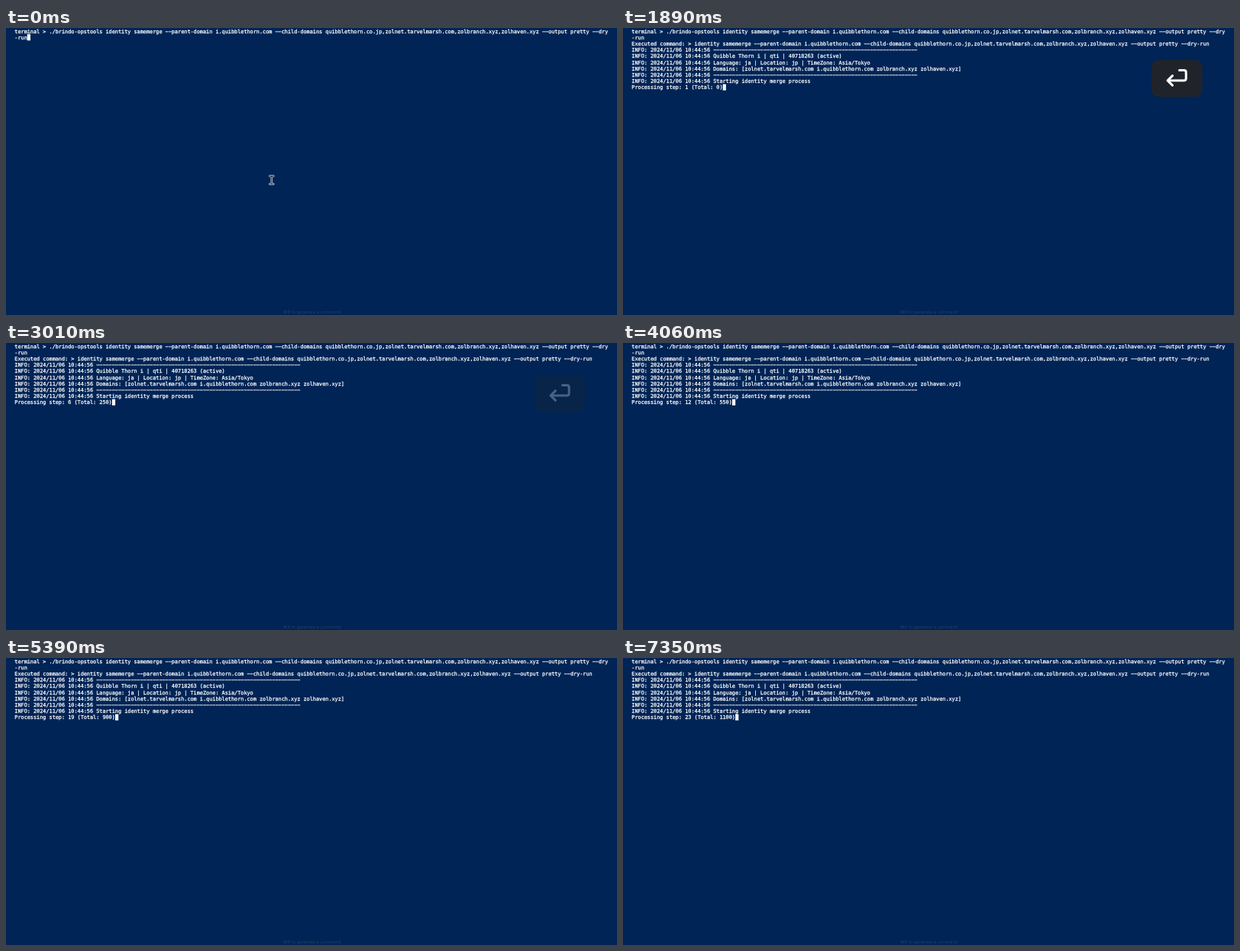
An HTML page that plays this animation: 800 px wide and 377 px high, repeating every 8 s.

```html
<!DOCTYPE html>
<html lang="en">
<head>
<meta charset="utf-8">
<title>Terminal session</title>
<style>
  html, body { margin: 0; width: 100%; height: 100%; overflow: hidden; background: #002456; }
  svg { display: block; width: 100%; height: 100%; }
  .row { font: 6.835px "DejaVu Sans Mono", monospace; fill: #fff; stroke: #fff; stroke-width: .26; text-rendering: geometricPrecision; }
  .hint { font: 5.75px Inter, "DejaVu Sans", sans-serif; fill: #213f64; text-anchor: middle; text-rendering: geometricPrecision; }
  .line { fill: none; stroke-linecap: round; stroke-linejoin: round; }
</style>
</head>
<body>
<svg id="stage" viewBox="0 0 800 377">
  <defs>
    <path id="beam" d="M345.4 194.6H350.2M347.8 194.6V205M345.4 205H350.2"/>
  </defs>
  <rect width="800" height="377" fill="#002456"/>
  <g id="rows"></g>
  <rect id="caret" width="4.2" height="8.2" fill="#fff"/>
  <text class="hint" x="400.5" y="375">⌘K to generate a command</text>
  <g id="pointer" class="line">
    <use href="#beam" stroke="#dfe3e6" stroke-width="2.5"/>
    <use href="#beam" stroke="#1b2740" stroke-width="1.1"/>
  </g>
  <g id="key">
    <rect x="692" y="42" width="66.5" height="48.5" rx="9.5" fill="#20242a"/>
    <path class="line" d="M728.5 55.5H734.5Q737.2 55.5 737.2 58.2V66Q737.2 69 734.2 69H713.5M719.5 62.7L713 69L719.5 75.3" stroke="#fff" stroke-width="3"/>
  </g>
</svg>
<script>
const LOOP = 8000, TICK = 70;
const LEFT = 11.3, ADVANCE = 4.115, PITCH = 8.2, BASELINE = 6.5;
const ENTER = 1680, LOGGED = 1820;

const el = id => document.getElementById(id);
const clamp = v => Math.max(0, Math.min(1, v));

const args = "identity samemerge --parent-domain i.quibblethorn.com --child-domains " +
  "quibblethorn.co.jp,zolnet.tarvelmarsh.com,zolbranch.xyz,zolhaven.xyz --output pretty --dry";
const info = text => "INFO: 2024/11/06 10:44:56 " + text;
const rule = info("-".repeat(65));

const prompt = ["terminal > ./brindo-opstools " + args, "-run"];
const log = [
  "Executed command: > " + args + "-run",
  rule,
  info("Quibble Thorn i | qti | 40718263 (active)"),
  info("Language: ja | Location: jp | TimeZone: Asia/Tokyo"),
  info("Domains: [zolnet.tarvelmarsh.com i.quibblethorn.com zolbranch.xyz zolhaven.xyz]"),
  rule,
  info("Starting identity merge process"),
];

// Moments at which the processing step goes up by one
const stepTimes = [1890, 2170, 2380, 2590, 2730, 2940, 3220, 3430, 3570, 3710, 3920, 4060,
  4270, 4410, 4620, 4830, 5040, 5180, 5390, 5880, 6300, 6720, 7210];

// Runs of hyphens nearly touch, so they use the wider minus sign
const widenDashes = text => text.replace(/-{2,}/g, run => "\u2212".repeat(run.length));

const rows = Array.from({ length: 10 }, (_, i) => {
  const row = document.createElementNS("http://www.w3.org/2000/svg", "text");
  row.setAttribute("class", "row");
  row.setAttribute("x", LEFT);
  row.setAttribute("y", BASELINE + i * PITCH);
  return el("rows").appendChild(row);
});

function screenAt(t) {
  if (t < ENTER) return prompt;
  const step = stepTimes.filter(s => s <= t).length;
  if (step) return [...prompt, ...log, `Processing step: ${step} (Total: ${(step - 1) * 50})`];
  return t < LOGGED ? [...prompt, ""] : [...prompt, log[0], ""];
}

function render(time) {
  const t = Math.floor((time % LOOP) / TICK) * TICK;
  const lines = screenAt(t);
  rows.forEach((row, i) => {
    const text = widenDashes(lines[i] || "");
    if (row.textContent !== text) row.textContent = text;
  });

  const last = lines.length - 1;
  el("caret").setAttribute("x", LEFT + lines[last].length * ADVANCE);
  el("caret").setAttribute("y", last * PITCH);
  el("pointer").setAttribute("opacity", t < ENTER ? 1 : 0);
  el("key").setAttribute("opacity", t < ENTER ? 0 : clamp((3063 - t) / 189));
}

const start = performance.now();
(function frame() {
  render(performance.now() - start);
  requestAnimationFrame(frame);
})();
</script>
</body>
</html>
```
